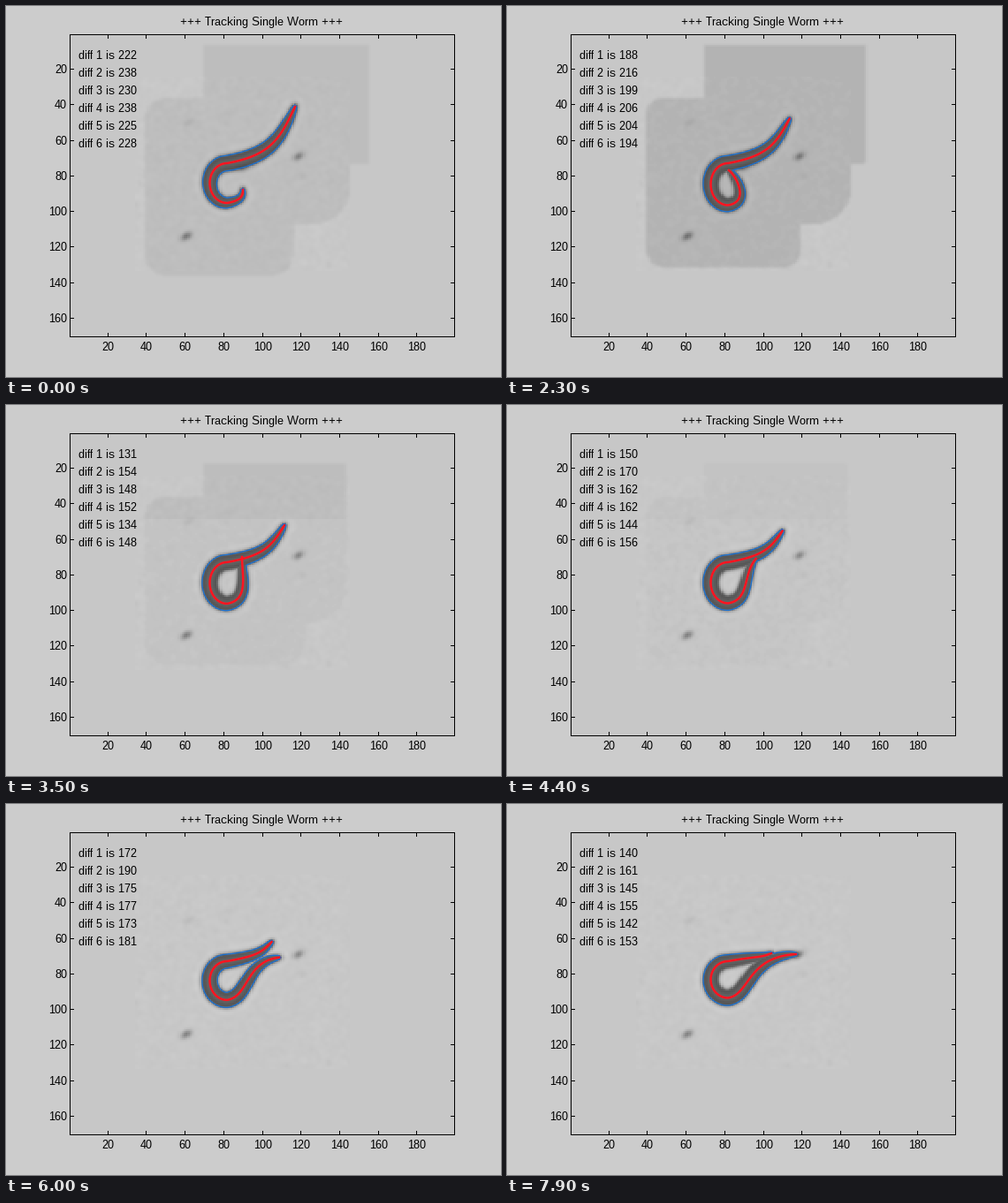
A matplotlib script for the animation above (8 s loop, 560x420 px).

```python
import numpy as np
import matplotlib.pyplot as plt
from matplotlib.animation import FuncAnimation

W, H, DPI = 560, 420, 100
FRAMES, STEP = 80, 100
HOLD = 4  # the first pose rests until this frame
L, R, T, B = 72, 507, 32, 374  # plot box
NX, NY = 199, 170  # camera cells
PX = 72 / DPI
plt.rcParams.update({"font.family": "Liberation Sans",
                     "text.hinting": "native", "text.hinting_factor": 1})

# frame, x, y
TAIL = [(HOLD, 327, 114), (53, 308, 149), (68, 292, 164), (79, 299, 169)]
# frame, x, y, heading in degrees
HEAD = [(HOLD, 268, 208, 90), (23, 251, 186, 143), (35, 267, 172, 90),
        (53, 296, 176, 10), (68, 324, 171, 3), (79, 327, 170, 3)]
# frame, mean reading
LEVEL = [(HOLD, 230), (11, 145), (23, 202), (35, 146), (53, 167),
         (68, 186), (79, 150)]
FIRST = np.array([222, 238, 230, 238, 225, 228])

rng = np.random.default_rng(4)
JITTER = rng.integers(-7, 8, (FRAMES, 6))
JITTER[:HOLD + 1] = 0


def ramp(f, keys):
    """Value (or values) at frame f, linear between keys."""
    t, *cols = np.array(keys, float).T
    v = np.array([np.interp(f, t, c) for c in cols])
    return v if len(v) > 1 else float(v[0])


def bezier(p, n=50):
    p = np.array(p, float)
    t = np.linspace(0, 1, n)[:, None]
    return ((1 - t) ** 3 * p[0] + 3 * t * (1 - t) ** 2 * p[1]
            + 3 * t * t * (1 - t) * p[2] + t ** 3 * p[3])


def worm(f, n=120):
    """Midline: tail, fixed left bend, then the head sliding round."""
    top = np.array([250, 178])
    low = np.array([250, ramp(f, [(HOLD, 223), (23, 225.5), (53, 224), (68, 219.5)])])

    tip = ramp(f, TAIL)
    d = tip - top
    tail = bezier([tip, tip - d * (0.22, 0.56),
                   top + 0.65 * d[0] * np.array([1, -0.18]), top])

    a = np.linspace(0, np.pi, 50)
    mid = (top + low) / 2
    ry = (low[1] - top[1]) / 2
    bend = np.c_[mid[0] - 19.5 * np.sin(a), mid[1] - ry * np.cos(a)]

    x, y, deg = ramp(f, HEAD)
    nose = np.array([x, y])
    reach = np.hypot(*(nose - low))
    aim = np.array([np.cos(np.radians(deg)), -np.sin(np.radians(deg))])
    head = bezier([low, low + min(25, 0.8 * reach) * np.array([1, -0.15]),
                   nose - aim * reach ** 2 / 150, nose])

    path = np.vstack([tail, bend[1:], head[1:]])
    s = np.r_[0, np.cumsum(np.hypot(*np.diff(path, axis=0).T))]
    e = np.linspace(0, s[-1], n)
    return np.c_[np.interp(e, s, path[:, 0]), np.interp(e, s, path[:, 1])]


WIDTH = 1.8 + 6.9 * np.clip(np.sin(np.linspace(0, np.pi, 120)), 0, 1) ** 0.6

gx = L + (np.arange(NX) + 0.5) * (R - L) / NX
gy = T + (np.arange(NY) + 0.5) * (B - T) / NY
GX, GY = np.meshgrid(gx, gy)
rows = slice(*np.searchsorted(gy, [95, 250]))
cols = slice(*np.searchsorted(gx, [200, 355]))
WX, WY = GX[rows, cols], GY[rows, cols]


def blur(a):
    for axis in (0, 1):
        a = (np.roll(a, 1, axis) + 2 * a + np.roll(a, -1, axis)) / 4
    return a


def box(x0, y0, x1, y1, r=2):
    """Mask of a rectangle with rounded corners."""
    dx = np.maximum(np.maximum(x0 + r - GX, GX - x1 + r), 0)
    dy = np.maximum(np.maximum(y0 + r - GY, GY - y1 + r), 0)
    return np.hypot(dx, dy) <= r


def patch(top, right, belly_right, bottom, r):
    """Shaded area: a tower, a belly and a rounded flank."""
    return blur((box(223, top, right, 178) | box(157, 104, belly_right, bottom, r)
                 | box(223, 100, min(right, 390), 248, 45)).astype(float))


def blob(x, y, sx, sy, tilt=0.5):
    c, s = np.cos(tilt), np.sin(tilt)
    a = (GX - x) * c - (GY - y) * s
    b = (GX - x) * s + (GY - y) * c
    return np.exp(-(a / sx) ** 2 - (b / sy) ** 2)


WIDE = patch(44, 411, 325, 305, 25)
CUT = patch(44, 406, 333, 295, 20)
LOW = patch(66, 385, 338, 293, 24)
BAND = LOW * (GY < 128)
MOTTLE = blur(blur(rng.normal(0, 4, (NY, NX)))) * box(146, 80, 388, 300)
SPOTS = (62 * blob(331, 170, 6.5, 4) + 66 * blob(204, 261, 6.5, 4)
         + 12 * blob(207, 131, 6, 4) + 9 * blob(336, 192, 4, 4))
NUB = blob(266, 181, 8, 5, 0)

# layer, then its darkness over time
SHADES = [
    (SPOTS, [(0, 1), (79, 1)]),
    (WIDE, [(4, 10), (11, 13), (17, 15), (18, 0)]),
    (CUT, [(17, 0), (18, 17), (23, 19), (30, 9), (35, 0)]),
    (LOW, [(23, 0), (35, 4), (53, 0)]),
    (BAND, [(23, 0), (35, 6), (50, 0)]),
    (NUB, [(11, 70), (30, 30), (53, 0)]),
]

fig = plt.figure(figsize=(W / DPI, H / DPI), dpi=DPI, facecolor="#cccccc")
ax = fig.add_axes([0, 0, 1, 1])
ax.set_xlim(0, W)
ax.set_ylim(H, 0)
ax.axis("off")

image = ax.imshow(np.full((NY, NX), 199.0), cmap="gray", vmin=0, vmax=255,
                  extent=(L, R, B, T), interpolation="nearest",
                  aspect="auto", zorder=1)
outline, = ax.plot([], [], color="#1a70d0", lw=1.3 * PX, zorder=3)
midline, = ax.plot([], [], color="#ff1420", lw=2.5 * PX, zorder=4)


def rule(xs, ys):
    ax.plot(np.array(xs) + 0.1, np.array(ys) + 0.1, color="black",
            lw=PX, antialiased=False, zorder=5)


def label(x, y, s, ha="left"):
    return ax.text(x, y, s, ha=ha, va="baseline", fontsize=13 * PX, zorder=6)


rule([L, R, R, L, L], [T, T, B, B, T])
for v in range(20, 181, 20):
    x = round(L + (v - 0.5) * (R - L) / NX)
    rule([x, x], [T, T + 4])
    rule([x, x], [B - 4, B])
    label(x + 0.5, 390, str(v), "center")
for v in range(20, 161, 20):
    y = round(T + (v - 0.5) * (B - T) / NY)
    rule([L, L + 4], [y, y])
    rule([R - 4, R], [y, y])
    label(69, y + 5, str(v), "right")
label(289, 22, "+++ Tracking Single Worm +++", "center")
readings = [label(82, 60 + 20 * i, "") for i in range(6)]


def outer_edge(field):
    cs = ax.contour(WX, WY, field, levels=[0])
    segs = cs.allsegs[0]
    cs.remove()
    return max(segs, key=lambda s: np.ptp(s[:, 0]) + np.ptp(s[:, 1]))


def draw(f):
    curve = worm(f)
    dist = np.hypot(WX[..., None] - curve[:, 0], WY[..., None] - curve[:, 1])
    gap = (dist - WIDTH).min(axis=-1)
    depth = (dist / WIDTH).min(axis=-1)

    g = 199 + MOTTLE - sum(ramp(f, keys) * layer for layer, keys in SHADES)
    cover = 1 / (1 + np.exp((gap - 0.7) / 1.1))
    body = 100 - 40 * np.clip(depth, 0, 1) ** 2
    halo = 4 * np.exp(-((gap - 7) / 3) ** 2)
    g[rows, cols] = (g[rows, cols] + halo) * (1 - cover) + body * cover
    image.set_data(g)

    outline.set_data(*outer_edge(gap).T)
    midline.set_data(*curve.T)
    values = FIRST + ramp(f, LEVEL) - LEVEL[0][1] + JITTER[f]
    for i, (txt, v) in enumerate(zip(readings, values), 1):
        txt.set_text(f"diff {i} is {v:.0f}")
    return [image, outline, midline, *readings]


anim = FuncAnimation(fig, draw, frames=FRAMES, interval=STEP, repeat=True,
                     repeat_delay=0, init_func=lambda: draw(0), blit=False)
plt.show()
```
